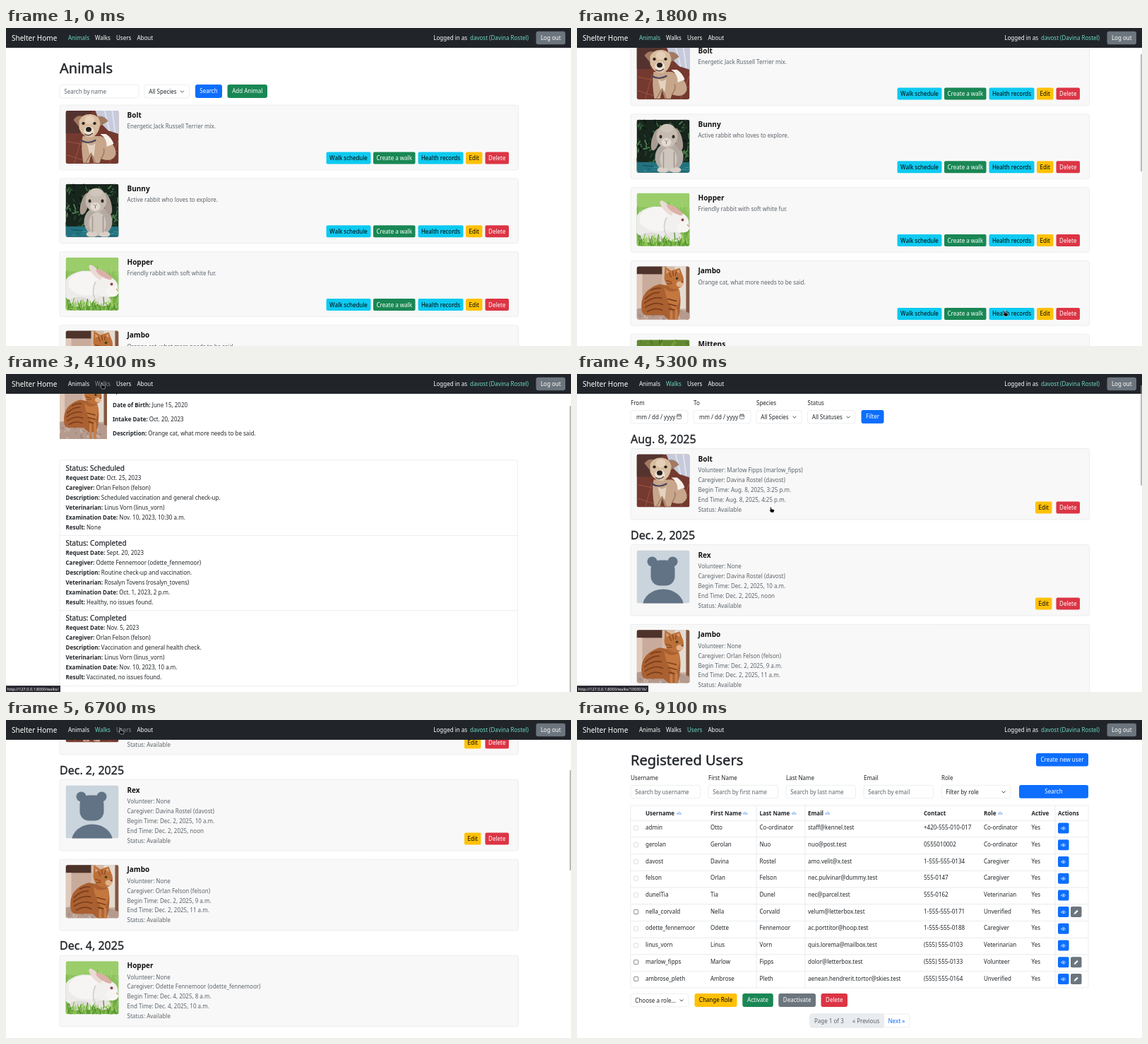
Write an HTML page that moves like this. It is 800 by 450 pixels and loops after 9.2 s.

```html
<!DOCTYPE html>
<html lang="en">
<head>
<meta charset="utf-8">
<title>Shelter Home</title>
<style>
  html, body { margin: 0; width: 100%; height: 100%; overflow: hidden; background: #fff; }
  svg { display: block; font-family: "Noto Sans", sans-serif; white-space: pre; }
</style>
</head>
<body>
<svg id="stage" width="800" height="450" viewBox="0 0 800 450"></svg>
<script>
const INK = '#212529', MUTED = '#5c636a', LINE = '#dee2e6', TEAL = '#6fd8c4';
const BLUE = '#0d6efd', GREEN = '#198754', CYAN = '#0dcaf0', YELLOW = '#ffc107', RED = '#dc3545', GRAY = '#6c757d';
const HOST = 'http://127.0.0.1:8000';

// Drawing helpers
const text = (x, y, str, fill = INK, size = 8, weight = 400, extra = '') =>
  `<text x="${x}" y="${y}" fill="${fill}" font-size="${size}" font-weight="${weight}" ${extra}>${str}</text>`;
const rect = (x, y, w, h, fill, stroke = 'none', r = 0) =>
  `<rect x="${x}" y="${y}" width="${w}" height="${h}" rx="${r}" fill="${fill}" stroke="${stroke}" stroke-width=".6"/>`;
const path = (d, fill, stroke = 'none', width = 1) =>
  `<path d="${d}" fill="${fill}" stroke="${stroke}" stroke-width="${width}" stroke-linecap="round" stroke-linejoin="round"/>`;
const oval = (x, y, rx, ry, fill, turn = 0) =>
  `<ellipse cx="${x}" cy="${y}" rx="${rx}" ry="${ry}" fill="${fill}" transform="rotate(${turn} ${x} ${y})"/>`;
// A thin outline gives headings their medium weight
const heading = (x, y, str, size) => text(x, y, str, INK, size, 500, `stroke="${INK}" stroke-width="${size * .022}"`);
const field = (x, y, w, str, fill = MUTED) => rect(x, y, w, 18.5, '#fff', LINE, 3) + text(x + 6.3, y + 12.2, str, fill);
const chevron = (x, y) => path(`M${x - 2.2} ${y - 1}l2.2 2.2 2.2-2.2`, 'none', '#343a40', .9);
const select = (x, y, w, str) => field(x, y, w, str, INK) + chevron(x + w - 10, y + 9.5);
const button = (x, y, w, h, str, fill) =>
  rect(x, y, w, h, fill, 'none', h > 18 ? 3 : 2) +
  text(x + w / 2, y + h / 2 + 2.9, str, fill === CYAN || fill === YELLOW ? '#000' : '#fff', 8, 400, 'text-anchor="middle"');
const labelled = (x, y, label, value) => text(x, y, `<tspan font-weight="700">${label}:</tspan> ${value}`);

// Scattered strokes for leaves and grass
let seed = 7;
const random = () => (seed = seed * 16807 % 2147483647) / 2147483647;
const strokes = (count, top, bottom, dx, dy, colors, width) => Array.from({ length: count }, () =>
  path(`M${(random() * 75).toFixed(1)} ${(top + random() * (bottom - top)).toFixed(1)}l${((random() - .5) * dx).toFixed(1)} ${(-random() * dy).toFixed(1)}`,
    'none', colors[Math.floor(random() * colors.length)], width)).join('');

// Animal pictures on a 75 x 75 square
const photos = {
  Bolt: rect(0, 0, 75, 75, '#74392f') + path('M0 0H38L20 32H0Z', '#54332f') + path('M42 0H75V33L60 28 48 16Z', '#c6cadb') +
    path('M55 0L62 28M66 0L70 30', 'none', '#dfe2ee', 2) + path('M0 43L75 58M0 62L40 75M12 75L22 40M62 75L75 40', 'none', '#9b5546', 1) +
    path('M24 36Q21 52 25 74H33L36 62 40 74H48L50 68Q66 74 71 62 72 46 50 36Z', '#c7a68b') +
    path('M30 46Q36 52 42 46L40 64 34 62Z', '#e4d2bf') + path('M49 33Q59 40 58 51L68 47Q65 38 57 33Z', '#f6f0e9') +
    path('M28 74L36 60 42 74M50 68Q56 60 54 54', 'none', '#9c775f', 1.4) +
    path('M11 13Q17 4 27 9L20 24Z M42 9Q54 5 60 15L47 23Z', '#a17a62') + path('M19 14Q24 4 36 5 47 6 49 17 48 33 37 38 24 38 19 25Z', '#d8bc9f') +
    oval(34, 13, 7, 6, '#e5cfb6') + oval(33, 29, 7, 7, '#ecdfd0') + oval(32.5, 26.5, 4, 3.5, '#231d1c') + path('M27 33Q33 37 38 32', 'none', '#4c3a34', 1.3) +
    oval(25, 18, 2.2, 2, '#2b211e') + oval(41, 18, 2.2, 2, '#2b211e') + path('M22 42Q31 48 42 42', 'none', '#45455a', 2.2),
  Bunny: rect(0, 0, 75, 75, '#17251d') + strokes(110, 0, 60, 9, 7, ['#35603a', '#22402a', '#0d1712', '#4c7a4a'], 2) +
    rect(0, 60, 75, 15, '#23727f') + strokes(26, 62, 75, 22, 1, ['#124f5c', '#3f9aa5'], 1) +
    oval(46, 53, 20, 21, '#b3aaa3') + oval(45, 56, 12, 16, '#cfc6be') + oval(27, 28, 5.5, 16, '#a99b90', 16) +
    oval(59, 28, 5.5, 16, '#ab9d93', -14) + oval(43, 23, 15, 17, '#c6bbb0') + oval(43, 12, 9, 6, '#d0c5bb') + oval(42, 32, 7, 6, '#e2dad2') +
    oval(34, 24, 2, 2.5, '#332b29') + oval(52, 24, 2, 2.5, '#332b29') + path('M40 29l2 2 2-2M42 31v3', 'none', '#84736b', 1) +
    oval(37, 71, 8, 4, '#d8cfc6') + oval(55, 71, 8, 4, '#d8cfc6') + path('M38 46V68M53 46V68', 'none', '#a0968e', 1.5),
  Hopper: rect(0, 0, 75, 75, '#9bcd6b') + rect(0, 20, 75, 30, '#8cc15c') + rect(0, 50, 75, 25, '#6aa63f') +
    strokes(70, 22, 60, 4, 12, ['#a5d577', '#7bb54c'], 1.2) + oval(28, 44, 32, 25, '#ecebea') + oval(30, 37, 26, 17, '#f6f5f4') +
    oval(57, 42, 17, 15, '#f2f0ee') + oval(66, 48, 9, 8, '#f7f5f2') + oval(53, 62, 12, 7, '#e6e3df') + oval(20, 63, 16, 7, '#dfddd9') +
    path('M42 35Q36 48 42 60', 'none', '#d5d3cf', 2) + oval(42, 21, 4.5, 13, '#eadbd5', -40) + oval(54, 24, 4, 13, '#dcb0a8', -58) +
    oval(65, 38, 2, 2, '#8f4650') + path('M72 45l2 2', 'none', '#cf9a98', 1.5) + strokes(130, 66, 80, 5, 13, ['#82bd4b', '#4b8a2b', '#a2d168'], 1.2),
  Jambo: rect(0, -12, 75, 100, '#c9ab9c') + rect(0, -12, 42, 23, '#4e332b') + rect(36, -12, 18, 75, '#d4bba8') +
    rect(54, -12, 16, 72, '#e4dcd2') + rect(70, -12, 5, 100, '#845840') + rect(0, 11, 8, 50, '#dfcabc') + path('M0 60Q40 52 75 66V88H0Z', '#b59a8e') +
    strokes(30, 64, 86, 6, 4, ['#9f857c', '#cdb6aa'], 2) +
    path('M7 60Q4 34 32 25L58 29Q66 44 58 76H46L38 69H15Q7 69 7 60Z', '#aa6031') + path('M39 30Q48 40 60 32 64 44 55 62 44 58 39 30Z', '#c4783f') +
    path('M12 46Q22 36 32 37M11 52Q24 42 35 45M12 58Q26 49 37 54M15 64Q26 57 36 62M20 34Q26 30 34 31M44 46l12 3M45 53l11 3M46 60l9 2', 'none', '#7b3d1c', 1.7) +
    path('M39 17L40 0 49 6 61 2 66 15Q69 30 55 32 42 31 39 17Z', '#bd7139') + path('M42 10V4l4 4ZM57 7l3-3 1 6Z', '#dba27f') +
    path('M46 9l3 6M51 7l1 6M56 8l-1 5M42 20l7 2M43 25l7-1', 'none', '#86461f', 1.2) +
    oval(61, 25, 5, 4, '#e0b38c') + oval(57, 17, 1.8, 1.8, '#3a4020') + oval(64.5, 22, 1.5, 1.2, '#8a4a3a') + path('M49 64V86M56 62V86', 'none', '#c67f48', 4),
  Mittens: rect(0, 0, 75, 75, '#63882f') + strokes(80, 0, 75, 5, 9, ['#7ba342', '#4c6e26'], 1.5) + oval(38, 46, 20, 24, '#77716c'),
  Rex: rect(0, 0, 75, 75, '#c9d4dc') + [22, 51].map(x => oval(x, 16, 7, 7, '#627386')).join('') +
    rect(20, 14, 34, 36, '#627386', 'none', 13) + oval(37.5, 79, 29, 24, '#627386')
};
const photo = (name, x, y) => `<g transform="translate(${x} ${y})"><g clip-path="url(#thumb)">${photos[name]}</g></g>`;
const card = (name, y, h) => rect(76, y, 649.5, h, '#f8f8f8', '#e3e5e6', 3) + photo(name, 84.5, y + 8) + text(171.5, y + 18, name, '#111', 10, 700);

function animalsPage() {
  const animals = [['Bolt', 'Energetic Jack Russell Terrier mix.'], ['Bunny', 'Active rabbit who loves to explore.'],
    ['Hopper', 'Friendly rabbit with soft white fur.'], ['Jambo', 'Orange cat, what more needs to be said.'], ['Mittens', '']];
  return heading(76, 63.5, 'Animals', 20) + field(76, 80.5, 112, 'Search by name') + select(196, 80.5, 63.5, 'All Species') +
    button(268, 80, 38, 19, 'Search', BLUE) + button(313.5, 80, 56.5, 19, 'Add Animal', GREEN) +
    animals.map(([name, about], i) => {
      const y = 109 + i * 103.8, b = y + 66.5;
      return card(name, y, 91.8) + text(171.5, y + 33.3, about, MUTED) +
        button(453.5, b, 63, 17, 'Walk schedule', CYAN) + button(520, b, 59.5, 17, 'Create a walk', GREEN) +
        button(583.5, b, 64, 17, 'Health records', CYAN) + button(651, b, 23.5, 17, 'Edit', YELLOW) + button(678.5, b, 33.5, 17, 'Delete', RED);
    }).join('');
}

function healthPage() {
  const facts = [['Species', 'Cat'], ['Date of Birth', 'June 15, 2020'], ['Intake Date', 'Oct. 20, 2023'],
    ['Description', 'Orange cat, what more needs to be said.']];
  const labels = ['Request Date', 'Caregiver', 'Description', 'Veterinarian', 'Examination Date', 'Result'];
  const requests = [
    ['Scheduled', 'Oct. 25, 2023', 'Orlan Felson (felson)', 'Scheduled vaccination and general check-up.', 'Linus Vorn (linus_vorn)', 'Nov. 10, 2023, 10:30 a.m.', 'None'],
    ['Completed', 'Sept. 20, 2023', 'Odette Fennemoor (odette_fennemoor)', 'Routine check-up and vaccination.', 'Rosalyn Tovens (rosalyn_tovens)', 'Oct. 1, 2023, 2 p.m.', 'Healthy, no issues found.'],
    ['Completed', 'Nov. 5, 2023', 'Orlan Felson (felson)', 'Vaccination and general health check.', 'Linus Vorn (linus_vorn)', 'Nov. 10, 2023, 10 a.m.', 'Vaccinated, no issues found.']];
  return `<svg x="76" y="49.5" width="67" height="88.5" viewBox="0 -12 75 99">${photos.Jambo}</svg>` +
    heading(151, 57, 'Jambo', 14) + facts.map(([k, v], i) => labelled(151, 73 + i * 20, k, v)).join('') +
    button(653.5, 43.5, 70.5, 18.5, 'Create Request', GREEN) + rect(76, 168, 648.5, 319.5, '#fff', LINE, 3) +
    requests.map(([status, ...values], i) => {
      const y = 168 + i * 106.4;
      return (i ? rect(76, y, 648.5, .1, 'none', LINE) : '') + heading(84.5, y + 14.5, 'Status: ' + status, 10) +
        values.map((v, j) => labelled(84.5, y + 27.5 + j * 14, labels[j], v)).join('');
    }).join('');
}

function walksPage() {
  const dateField = x => rect(x, 92.5, 81, 18.5, '#fff', LINE, 3) + text(x + 8, 104.7, 'mm / dd / yyyy') +
    rect(x + 65.5, 98.5, 6, 6, 'none', '#343a40', 1) + path(`M${x + 65.5} 100.3h6M${x + 67} 97.5v1.5M${x + 70} 97.5v1.5`, 'none', '#343a40', .8);
  const walk = (name, y, who, giver, begin, end, editable) => card(name, y, 100.5) +
    [`Volunteer: ${who}`, `Caregiver: ${giver}`, `Begin Time: ${begin}`, `End Time: ${end}`, 'Status: Available']
      .map((s, i) => text(171.5, y + 33.3 + i * 13.95, s, MUTED)).join('') +
    (editable ? button(649, y + 75, 23.5, 17, 'Edit', YELLOW) + button(678.5, y + 75, 33.5, 17, 'Delete', RED) : '');
  return heading(76, 63.5, 'Walks', 20) +
    text(76, 85, 'From') + text(165, 85, 'To') + text(254, 85, 'Species') + text(326.5, 85, 'Status') + dateField(76) + dateField(165) +
    select(254, 92.5, 64, 'All Species') + select(326.5, 92.5, 67.5, 'All Statuses') + button(402.5, 92, 32, 19, 'Filter', BLUE) +
    heading(76, 138.5, 'Aug. 8, 2025', 16) +
    walk('Bolt', 146.5, 'Marlow Fipps (marlow_fipps)', 'Davina Rostel (davost)', 'Aug. 8, 2025, 3:25 p.m.', 'Aug. 8, 2025, 4:25 p.m.', true) +
    heading(76, 274.5, 'Dec. 2, 2025', 16) +
    walk('Rex', 282.5, 'None', 'Davina Rostel (davost)', 'Dec. 2, 2025, 10 a.m.', 'Dec. 2, 2025, noon', true) +
    walk('Jambo', 395.3, 'None', 'Orlan Felson (felson)', 'Dec. 2, 2025, 9 a.m.', 'Dec. 2, 2025, 11 a.m.') +
    heading(76, 523.2, 'Dec. 4, 2025', 16) +
    walk('Hopper', 531.2, 'None', 'Odette Fennemoor (odette_fennemoor)', 'Dec. 4, 2025, 8 a.m.', 'Dec. 4, 2025, 10 a.m.');
}

function usersPage() {
  const columns = [97, 189, 258.5, 327, 491, 576, 643.5, 681];
  const titles = ['Username', 'First Name', 'Last Name', 'Email', 'Contact', 'Role', 'Active', 'Actions'];
  const users = [
    'admin|Otto|Co-ordinator|staff@kennel.test|+420-555-010-017|Co-ordinator',
    'gerolan|Gerolan|Nuo|nuo@post.test|0555010002|Co-ordinator',
    'davost|Davina|Rostel|amo.velit@x.test|1-555-555-0134|Caregiver',
    'felson|Orlan|Felson|nec.pulvinar@dummy.test|555-0147|Caregiver',
    'dunelTia|Tia|Dunel|nec@parcel.test|555-0162|Veterinarian',
    'nella_corvald|Nella|Corvald|velum@letterbox.test|1-555-555-0171|Unverified',
    'odette_fennemoor|Odette|Fennemoor|ac.porttitor@hoop.test|1-555-555-0188|Caregiver',
    'linus_vorn|Linus|Vorn|quis.lorema@mailbox.test|(555) 555-0103|Veterinarian',
    'marlow_fipps|Marlow|Fipps|dolor@letterbox.test|(555) 555-0133|Volunteer',
    'ambrose_pleth|Ambrose|Pleth|aenean.hendrerit.tortor@skies.test|(555) 555-0164|Unverified'];
  const filters = [['Username', 'username'], ['First Name', 'first name'], ['Last Name', 'last name'], ['Email', 'email']];
  const eye = (x, y) => path(`M${x - 3} ${y}q3-4 6 0q-3 4-6 0Z`, 'none', '#fff', .7) + oval(x, y, .9, .9, '#fff');
  const pencil = (x, y) => path(`M${x - 2.8} ${y + 2.8}l.7-2 3.5-3.5 1.4 1.4-3.5 3.5Z`, '#fff', '#fff', .4);
  const row = (line, i) => {
    const y = 152.5 + i * 23.72, cells = [...line.split('|'), 'Yes'], editable = /Unver|Volun/.test(line);
    return rect(76, y - 10.4, 648, .1, 'none', LINE) + rect(80.7, y - 2.6, 6, 6, '#fff', editable ? '#343a40' : '#c3c7cb', 1) +
      cells.map((c, j) => text(columns[j], y + 2.6, c)).join('') + rect(681, y - 7, 15.5, 15, BLUE, 'none', 2) + eye(688.7, y + .8) +
      (editable ? rect(699, y - 7, 15.5, 15, GRAY, 'none', 2) + pencil(706.7, y + .6) : '');
  };
  return heading(76, 63.5, 'Registered Users', 20) + button(650, 47, 74, 18.5, 'Create new user', BLUE) +
    filters.map(([label, hint], i) => text(76 + i * 110, 85, label) + field(76 + i * 110, 92.3, 98.5, 'Search by ' + hint)).join('') +
    text(516, 85, 'Role') + select(516, 92.3, 98, 'Filter by role') + button(626, 92, 98, 18.8, 'Search', BLUE) +
    rect(76, 121, 648, 258, '#fff', LINE) + [254, 323, 677].map(x => rect(x, 121, .1, 258, 'none', LINE)).join('') +
    titles.map((s, i) => text(columns[i], 134.5, s, INK, 8, 700)).join('') +
    [144.5, 238.3, 307.3, 354.8, 599.3].map(x => path(`M${x - 2.8} 132.7l2.8-2.6 2.8 2.6Z`, '#fff', '#4d94fe', .8)).join('') +
    users.map(row).join('') + select(76, 387.3, 82, 'Choose a role...') +
    button(166.5, 387, 60, 19, 'Change Role', YELLOW) + button(234.3, 387, 43.5, 19, 'Activate', GREEN) +
    button(285.3, 387, 52.7, 19, 'Deactivate', GRAY) + button(345.5, 387, 37.5, 19, 'Delete', RED) +
    rect(330, 416, 141, 19, '#fff', LINE, 3) + rect(330, 416, 104.5, 19, '#e9ecef', LINE, 3) +
    text(336, 428.5, 'Page 1 of 3', MUTED) + text(390, 428.5, '« Previous', MUTED) + text(440.5, 428.5, 'Next »', BLUE);
}

const stage = document.getElementById('stage');
stage.innerHTML = `<defs><clipPath id="thumb">${rect(0, 0, 75, 75, '#000', 'none', 3)}</clipPath></defs>` +
  [animalsPage, healthPage, walksPage, usersPage].map(draw => `<g class="page">${draw()}</g>`).join('') +
  rect(0, 0, 800, 28, INK) + text(8, 17.7, 'Shelter Home', '#fff', 10) +
  [['Animals', 88], ['Walks', 126], ['Users', 156], ['About', 185.5]].map(([s, x]) => text(x, 17, s, '#fff', 8, 400, 'class="link"')).join('') +
  text(605.3, 17, 'Logged in as', '#fff') + text(657, 17, 'davost (Davina Rostel)', TEAL) + button(750.5, 4.8, 41.5, 18.5, 'Log out', GRAY) +
  `<rect id="bar" x="798.4" width="1.2" rx=".6" fill="#8d8d8d"/>` +
  `<g id="status"><rect y="441" height="9" fill="#2b2a33"/>${text(1.8, 447.5, '', '#fff', 5.56)}</g>` +
  `<g id="arrow">${path('M0 0V7.2L1.7 5.7 2.9 8.3 4 7.8 2.9 5.3H5Z', '#000', '#fff', .5)}</g>` +
  `<g id="hand">${path('M1.4 0Q2.3 0 2.3 1V3L5.8 3.8Q6.5 4 6.3 5L5.6 8H1.8L-.8 4.8Q-.3 4 .6 4.8V1Q.6 0 1.4 0Z', '#000', '#fff', .5)}</g>`;

const $ = id => document.getElementById(id);
const pages = stage.querySelectorAll('.page'), links = stage.querySelectorAll('.link');

// Keys are [time, ...values], eased between neighbours
function track(t, keys) {
  const i = keys.findIndex(k => k[0] > t);
  if (i < 1) return (i ? keys[keys.length - 1] : keys[0]).slice(1);
  const a = keys[i - 1], b = keys[i], u = (t - a[0]) / (b[0] - a[0]), e = u * u * (3 - 2 * u);
  return a.slice(1).map((v, j) => v + (b[j + 1] - v) * e);
}
const within = (t, ...spans) => spans.some(([from, to]) => t >= from && t < to);
const starts = [0, 2200, 4400, 7000];
const scrolls = [
  [[500, 0], [1100, 91]],
  [[2800, 0], [3400, 46]],
  [[4900, 0], [5300, 41], [5500, 60], [6300, 198]],
  [[0, 0]]];
const bars = [[3.4, .369, 166], [0, .98, 405], [1.6, .35, 142]];  // top, travel per scrolled pixel, length
const pointer = [[500, 352, 232], [1100, 350.5, 218.3], [1800, 604, 400], [2200, 604, 400], [2600, 550.7, 276.8], [3300, 545, 270],
  [4000, 134.3, 13], [4500, 134.3, 13], [5200, 273, 188], [5700, 273, 188], [6600, 160.7, 12], [7100, 160.7, 12], [7900, 330, 455]];

function show(t) {
  const current = starts.filter(s => t >= s).length - 1;
  const [scroll] = track(t, scrolls[current]);
  pages.forEach((p, i) => {
    p.style.display = i === current ? '' : 'none';
    p.setAttribute('transform', `translate(0 ${-scroll})`);
  });

  const active = [0, -1, 1, 2][current];
  const hovered = within(t, [4000, 4400]) ? 1 : within(t, [6600, 7000]) ? 2 : -1;
  links.forEach((l, i) => l.setAttribute('fill', i === hovered ? '#8b9197' : i === active ? TEAL : '#fff'));

  const bar = bars[current];
  $('bar').style.display = bar && t >= 500 ? '' : 'none';
  if (bar) {
    $('bar').setAttribute('y', bar[0] + bar[1] * scroll);
    $('bar').setAttribute('height', bar[2]);
  }

  const url = within(t, [4000, 4400]) ? '/walks/' : within(t, [5200, 5700]) ? '/walks/1003016/' : '';
  $('status').style.display = url ? '' : 'none';
  $('status').firstChild.setAttribute('width', url.length > 7 ? 101 : 77);
  $('status').lastChild.textContent = HOST + url;

  const hand = within(t, [1700, 2200], [4000, 4400], [5100, 5800], [6600, 7000]), visible = within(t, [600, 7900]);
  for (const [id, on] of [['hand', hand], ['arrow', !hand]]) {
    $(id).style.display = on && visible ? '' : 'none';
    $(id).setAttribute('transform', `translate(${track(t, pointer).join(' ')})`);
  }
}

const begin = performance.now();
function tick() {
  const t = (performance.now() - begin) % 9200;
  show(Math.floor(t / 100) * 100);
  requestAnimationFrame(tick);
}
tick();
</script>
</body>
</html>
```
